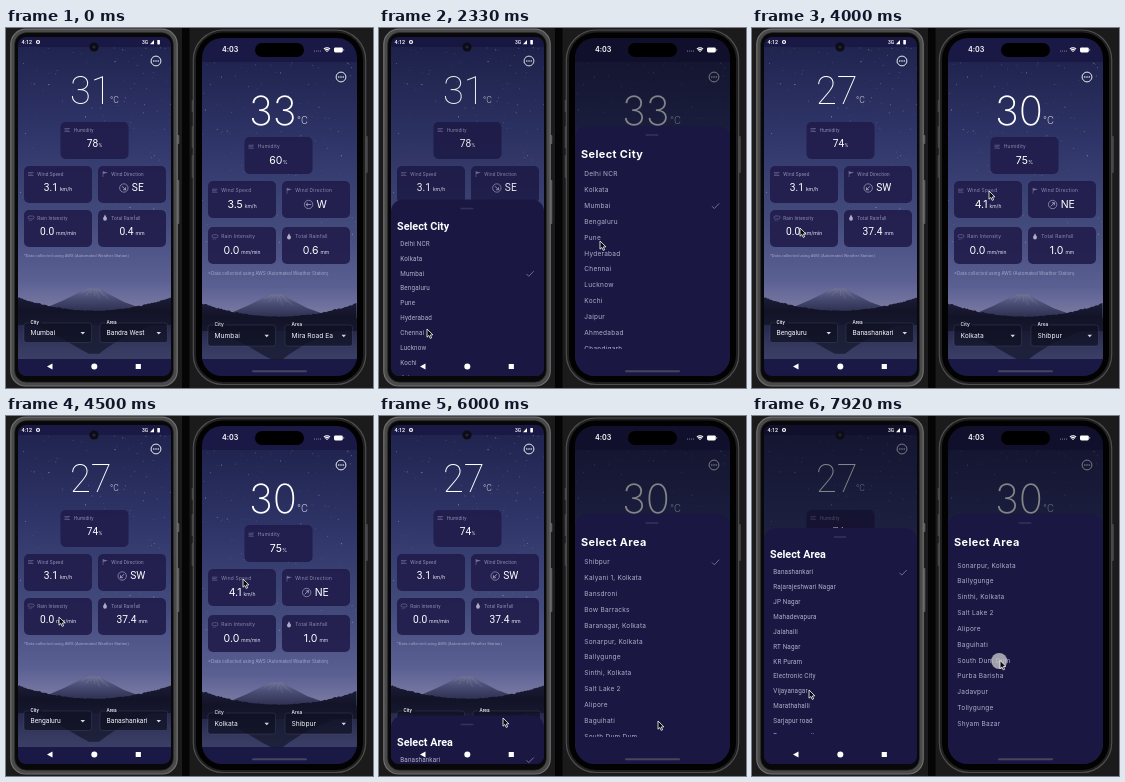
Animation of 367 by 360 pixels, one loop 8000 ms. Source, as an HTML page with a canvas:

```html
<!DOCTYPE html>
<html lang="en">
<head>
<meta charset="utf-8">
<title>Weather app on two phones</title>
<style>
  html, body { margin: 0; width: 100%; height: 100%; overflow: hidden; background: #181819; }
  canvas { display: block; width: 367px; height: 360px; }
</style>
</head>
<body>
<canvas id="stage"></canvas>
<script>
const W = 367, H = 360, LOOP = 8000;
const canvas = document.getElementById('stage');
const ctx = canvas.getContext('2d');
const ratio = window.devicePixelRatio || 1;
canvas.width = W * ratio;
canvas.height = H * ratio;

const CITIES = ['Delhi NCR', 'Kolkata', 'Mumbai', 'Bengaluru', 'Pune', 'Hyderabad', 'Chennai',
  'Lucknow', 'Kochi', 'Jaipur', 'Ahmedabad', 'Chandigarh'];
const NAVY = '#1a1945', SHEET = '#1a1842';

const android = {
  dx: 0, font: 'Roboto, sans-serif', spacing: 0.15,
  screen: [12, 9, 153, 339, 8], sky: [19, 331], peak: [88, 260], seed: 7,
  menu: [150, 33], temp: [64, 75.5, 38], tempWeight: 200, degree: [104, 75, 8.6],
  rows: [94, 138, 182], labelDy: 8, valueDy: 22, value: 10.2, unit: 5.2, label: 4.7,
  note: [227.5, 4.2], drop: [295, 19.5], dropX: [18, 94], dropSize: 6.75,
  sheet: { top: 112, hidden: 347, title: 27, titleSize: 10.8, row: 44.6, pitch: 14.86, size: 6.3, bottom: 206, check: 151, handle: 88 },
  opens: [[2184, 3650, 400], [5972, 9000, 400]],
  dim: p => 0.5 * clamp((p - 0.7) / 0.3),
  chosenAt: 3650, loadedAt: 4000,
  places: [['Mumbai', 'Bandra West'], ['Bengaluru', 'Banashankari']],
  data: [
    { temp: '31', humidity: '78', wind: '3.1', dir: 'SE', angle: 45, rain: '0.4' },
    { temp: '27', humidity: '74', wind: '3.1', dir: 'SW', angle: 135, rain: '37.4' }],
  cityChecks: [2, 3],
  areas: ['Banashankari', 'Rajarajeshwari Nagar', 'JP Nagar', 'Mahadevapura', 'Jalahalli', 'RT Nagar',
    'KR Puram', 'Electronic City', 'Vijayanagar', 'Marathahalli', 'Sarjapur road', 'Basavanagudi'],
  scroll: () => 0,
  cursor: [[0, 62, 372], [500, 55, 340], [900, 48, 301], [2330, 48, 301], [2900, 45, 240], [3330, 42, 213],
    [3600, 42, 200], [4000, 48, 200], [4500, 53, 201], [5300, 100, 270], [5700, 124, 302], [6250, 124, 302],
    [7000, 80, 270], [7920, 57, 274]]
};

const iphone = {
  dx: 184, font: 'Inter, sans-serif', spacing: 0.25,
  screen: [196, 10, 155, 338, 20], sky: [34, 331], peak: [271, 266], seed: 19,
  menu: [335, 49], temp: [243, 97, 40], tempWeight: 200, degree: [291, 96, 10.6],
  rows: [109, 153, 199], labelDy: 9.7, valueDy: 23.5, value: 10.5, unit: 5, label: 4.8,
  note: [245.5, 4.5], drop: [297, 21], dropX: [202, 279], dropSize: 6.7,
  sheet: { top: 98, hidden: 348, title: 29, titleSize: 10.9, row: 48.3, pitch: 15.85, size: 6.5, bottom: 223, check: 336.5, handle: 273 },
  opens: [[1400, 3100, 450], [5150, 9000, 450]],
  dim: p => 0.5 * Math.sqrt(clamp(p)),
  chosenAt: 3100, loadedAt: 3750,
  places: [['Mumbai', 'Mira Road Ea'], ['Kolkata', 'Shibpur']],
  data: [
    { temp: '33', humidity: '60', wind: '3.5', dir: 'W', angle: 180, rain: '0.6' },
    { temp: '30', humidity: '75', wind: '4.1', dir: 'NE', angle: -45, rain: '1.0' }],
  cityChecks: [2, 1],
  areas: ['Shibpur', 'Kalyani 1, Kolkata', 'Bansdroni', 'Bow Barracks', 'Baranagar, Kolkata', 'Sonarpur, Kolkata',
    'Ballygunge', 'Sinthi, Kolkata', 'Salt Lake 2', 'Alipore', 'Baguihati', 'South Dum Dum', 'Purba Barisha',
    'Jadavpur', 'Tollygunge', 'Shyam Bazar'],
  scroll: t => 76 * ease((t - 6250) / 900),
  cursor: [[0, 262, 372], [800, 249, 310], [1100, 247, 293], [1400, 247, 293], [2000, 228, 235], [2330, 221, 213],
    [2800, 218, 163], [3050, 220, 160], [3330, 237, 163], [4500, 237, 163], [4900, 290, 300], [5400, 290, 300],
    [6000, 279, 305], [6500, 279, 300], [7000, 275, 270], [7500, 252, 246], [7920, 248, 244.5]]
};

function clamp(v) { return Math.min(1, Math.max(0, v)); }
function ease(v) { return 1 - (1 - clamp(v)) ** 3; }

function random(seed) {
  return () => (seed = (seed * 16807) % 2147483647) / 2147483647;
}

function along(keys, t) {
  const i = keys.findIndex(k => k[0] > t);
  if (i < 0) return keys.at(-1).slice(1);
  const [a, b] = [keys[i - 1], keys[i]];
  const u = (t - a[0]) / (b[0] - a[0]), s = u * u * (3 - 2 * u);
  return [a[1] + (b[1] - a[1]) * s, a[2] + (b[2] - a[2]) * s];
}

function box(x, y, w, h, r, fill, stroke, line = 1) {
  ctx.beginPath();
  ctx.roundRect(x, y, w, h, r);
  paint(fill, stroke, line);
}

function circle(x, y, r, fill, stroke, line = 1) {
  ctx.beginPath();
  ctx.arc(x, y, r, 0, 7);
  paint(fill, stroke, line);
}

function shape(points, fill, stroke, line = 1) {
  ctx.beginPath();
  points.forEach(([x, y]) => ctx.lineTo(x, y));
  if (fill) ctx.closePath();
  paint(fill, stroke, line);
}

function paint(fill, stroke, line) {
  if (fill) { ctx.fillStyle = fill; ctx.fill(); }
  if (stroke) { ctx.strokeStyle = stroke; ctx.lineWidth = line; ctx.stroke(); }
}

function setFont(size, family, weight = 400, spacing = 0) {
  ctx.font = `${weight} ${size}px ${family}`;
  ctx.letterSpacing = spacing + 'px';
}

function text(str, x, y, color, size, family, weight, spacing) {
  setFont(size, family, weight, spacing);
  ctx.fillStyle = color;
  ctx.fillText(str, x, y);
}

function gradient(y0, y1, ...stops) {
  const g = ctx.createLinearGradient(0, y0, 0, y1);
  stops.forEach(([at, color]) => g.addColorStop(at, color));
  return g;
}

function drawLandscape(p) {
  const [x, , w] = p.screen, [top, bottom] = p.sky, [px, py] = p.peak;
  const base = py + 24, shore = py + 37;
  ctx.fillStyle = gradient(top, base, [0, '#20244f'], [0.3, '#2e3467'], [0.65, '#434a7c'], [0.88, '#5b6093'], [1, '#7d7da4']);
  ctx.fillRect(x, top, w, base - top);

  const rnd = random(p.seed);
  for (let i = 0; i < 190; i++) {
    const sx = x + rnd() * w, sy = top + rnd() ** 1.4 * 190, s = 0.35 + rnd() * 0.6;
    ctx.fillStyle = `rgba(200,208,245,${0.12 + rnd() ** 2 * 0.6})`;
    ctx.fillRect(sx, sy, s, s);
  }

  const ridge = [[-58, 24], [-30, 12], [-14, 4], [-5, 0], [5, 0], [13, 5], [30, 14], [58, 24]];
  const at = ([dx, dy]) => [px + dx, py + dy];
  shape(ridge.map(at), gradient(py, base, [0, '#6c6e93'], [0.4, '#4b4e75'], [1, '#2b2e4d']));
  for (let i = -3; i <= 3; i++) {
    shape([[i * 1.6, 1], [i * 4.6 + 1, 8 + i % 2 * 3]].map(at), null, 'rgba(160,162,190,.35)', 0.6);
  }

  // Lake with the mirrored mountain, then the dark land in front of it.
  ctx.fillStyle = gradient(shore - 2, bottom, [0, '#25274a'], [0.5, '#33365c'], [1, '#3b3e66']);
  ctx.fillRect(x, base, w, bottom - base);
  shape(ridge.map(([dx, dy]) => [px + dx, shore + (24 - dy) * 1.2]), 'rgba(22,24,46,.75)');

  const land = [[x, shore]];
  for (let dx = 0; dx <= w; dx += 1.5) {
    const edge = Math.abs(dx / w * 2 - 1);
    land.push([x + dx, base - 1 - 13 * edge ** 2 - rnd() * (0.6 + edge)]);
  }
  land.push([x + w, shore]);
  shape(land, gradient(base - 14, shore, [0, '#1b1c36'], [0.5, '#121327'], [1, '#16182f']));
}

function drawIcon(kind, x, y) {
  const c = '#7572a0';
  if (kind === 'wind') {
    [-1.5, 0, 1.5].forEach((d, i) => shape([[x - 3, y + d], [x + 2.5 - i % 2, y + d]], null, c, 0.6));
  } else if (kind === 'flag') {
    shape([[x - 2, y + 3], [x - 2, y - 3]], null, c, 0.6);
    shape([[x - 2, y - 2.5], [x + 3, y - 1.5], [x - 2, y]], c);
  } else if (kind === 'cloud') {
    box(x - 3, y - 2, 6, 3, 1.5, null, c, 0.6);
    [-1.5, 0.5].forEach(d => shape([[x + d, y + 2], [x + d - 0.6, y + 3.2]], null, c, 0.5));
  } else {
    shape([[x, y - 3.5], [x + 1.7, y], [x - 1.7, y]], '#aeacc9');
    circle(x, y + 0.8, 1.9, '#aeacc9');
  }
}

function drawCard(p, x, y, icon, label, value, unit, angle) {
  box(x, y, 68, 37, 5, 'rgba(33,28,76,.9)');
  const ly = y + p.labelDy, vy = y + p.valueDy;
  drawIcon(icon, x + 7, ly);
  text(label, x + 13.3, ly + 0.2, '#8f8db4', p.label, p.font, 400, p.spacing);

  const gap = unit === '%' ? 0.3 : 2, compass = angle !== undefined;
  setFont(p.value, p.font);
  const big = ctx.measureText(value).width;
  setFont(p.unit, p.font);
  const small = unit ? ctx.measureText(unit).width + gap : 0;
  let left = x + 34 - (big + small + (compass ? 12.5 : 0)) / 2;
  if (compass) {
    ctx.save();
    ctx.translate(left + 4, vy);
    circle(0, 0, 4.2, null, '#b9b8d2', 0.6);
    ctx.rotate(angle * Math.PI / 180);
    shape([[-2.6, 0], [2.6, 0]], null, '#b9b8d2', 0.7);
    shape([[0.6, -1.7], [2.6, 0], [0.6, 1.7]], null, '#b9b8d2', 0.7);
    ctx.restore();
    left += 12;
  }
  text(value, left, vy + 0.3, '#fff', p.value, p.font);
  if (unit) text(unit, left + big + gap, vy + 1.6, '#e4e3f0', p.unit, p.font);
}

function drawDropdown(p, x, label, value) {
  const [y, h] = p.drop;
  box(x, y, 67.5, h, 2.5, 'rgba(15,16,34,.72)', 'rgba(140,142,172,.28)', 0.6);
  ctx.fillStyle = '#14162b';
  ctx.fillRect(x + 5, y - 1, 13, 2);
  text(label, x + 6.5, y - 0.5, '#f0f0f6', 4.8, p.font, 500);
  const mid = y + h / 2 + 0.2;
  text(value, x + 6.5, mid, '#f3f3f8', p.dropSize, p.font);
  shape([[x + 56.5, mid - 1], [x + 61, mid - 1], [x + 58.75, mid + 1.5]], '#d8d8e2');
}

function drawApp(p, t) {
  const d = p.data[+(t >= p.loadedAt)], place = p.places[+(t >= p.chosenAt)];
  const [r1, r2, r3] = p.rows, x = p.dx;
  const [mx, my] = p.menu;
  circle(mx, my, 4.9, null, '#fff', 0.9);
  [-2.2, 0, 2.2].forEach(i => circle(mx + i, my, 0.75, '#fff'));

  ctx.textBaseline = 'alphabetic';
  text(d.temp, p.temp[0], p.temp[1], '#fff', p.temp[2], p.font, p.tempWeight);
  text('°C', p.degree[0], p.degree[1], '#d6d6e6', p.degree[2], 'Roboto, sans-serif', 300);
  ctx.textBaseline = 'middle';

  drawCard(p, x + 54.5, r1, 'wind', 'Humidity', d.humidity, '%');
  drawCard(p, x + 18, r2, 'wind', 'Wind Speed', d.wind, 'km/h');
  drawCard(p, x + 92, r2, 'flag', 'Wind Direction', d.dir, '', d.angle);
  drawCard(p, x + 18, r3, 'cloud', 'Rain Intensity', '0.0', 'mm/min');
  drawCard(p, x + 92, r3, 'drop', 'Total Rainfall', d.rain, 'mm');
  text('*Data collected using AWS (Automated Weather Station)', x + 18, p.note[0], '#a3a5c8', p.note[1], p.font);
  drawDropdown(p, p.dropX[0], 'City', place[0]);
  drawDropdown(p, p.dropX[1], 'Area', place[1]);
}

function drawSheet(p, t, shown) {
  const s = p.sheet, [x, , w] = p.screen, left = p.dx + 18;
  const top = s.hidden - (s.hidden - s.top) * shown;
  const picksArea = t > 4600;
  const items = picksArea ? p.areas : CITIES;
  const checked = picksArea ? 0 : p.cityChecks[+(t >= p.chosenAt)];
  const scroll = picksArea ? p.scroll(t) : 0;

  box(x, top, w, H, [12, 12, 0, 0], SHEET);
  box(s.handle - 6.5, top + 8.3, 13, 1.4, 0.7, '#34325f');
  text(picksArea ? 'Select Area' : 'Select City', left, top + s.title, '#fff', s.titleSize, p.font, 700, p.dx ? 0.4 : 0);

  ctx.save();
  ctx.beginPath();
  ctx.rect(x, top + s.row - 8, w, s.bottom - s.row + 8);
  ctx.clip();
  items.forEach((item, i) => {
    const y = top + s.row + i * s.pitch - scroll;
    text(item, left + 3.3, y, '#b0aec8', s.size, p.font, 400, p.spacing);
    if (i === checked) {
      shape([[s.check - 3.5, y + 0.2], [s.check - 1.2, y + 2.5], [s.check + 3.7, y - 2.6]], null, '#8583a2', 0.8);
    }
  });
  ctx.restore();
}

function drawAndroidChrome() {
  text('4:12', 15.5, 14.2, '#fff', 5.4, android.font, 500);
  circle(32, 14, 1.5, null, '#fff', 1.2);
  text('3G', 136, 14.2, '#fff', 5, android.font, 500);
  shape([[144, 16.3], [148, 16.3], [148, 12]], '#fff');
  box(151.3, 12, 2.6, 4.4, 0.6, '#fff');
  circle(88, 19, 4.6, '#0c0c14');
  circle(88, 19, 1.6, '#20243c');
  shape([[41, 338.5], [46.5, 335.5], [46.5, 341.5]], '#fff');
  circle(88.3, 338.5, 3, '#fff');
  box(129.7, 335.9, 5.2, 5.2, 0.3, '#fff');
}

function drawIphoneChrome() {
  text('4:03', 216, 22.2, '#fff', 7.2, iphone.font, 600);
  box(249, 15, 49, 14, 7, '#000');
  for (let i = 0; i < 4; i++) circle(308.5 + i * 2, 23, 0.6, '#8f8fae');
  for (const r of [1.2, 2.8, 4.4]) {
    ctx.beginPath();
    ctx.arc(321, 24.3, r, -2.35, -0.8);
    paint(null, '#fff', 1.1);
  }
  box(328, 19.4, 8.8, 5, 1.4, '#fff');
  box(337.3, 21, 0.8, 1.8, 0.4, '#aaa');
  box(246, 342.2, 55, 2, 1, '#45455f');
}

function drawBodies() {
  ctx.fillStyle = '#1b1b1c';
  ctx.fillRect(0, 0, W, H);
  ctx.fillStyle = '#050505';
  ctx.fillRect(176, 0, 7.5, H);

  [[107, 9], [152, 44]].forEach(([y, h]) => box(170.5, y, 2.8, h, 1, '#5d5d5f'));
  box(4.8, 1.2, 166.4, 356.8, 15, '#49494a', '#707072', 1.2);
  box(8.6, 4.6, 158.8, 349.6, 12, '#08080a', '#2c2c2e', 0.6);

  [[72, 12], [98, 22], [127, 23]].forEach(([y, h]) => box(185.7, y, 2.5, h, 1, '#464648'));
  box(359.3, 108, 2.5, 37, 1, '#464648');
  box(187.3, 2, 172.4, 354.5, 30, '#1f1f20', '#4e4e50', 1.2);
  box(190, 4.4, 167, 349.6, 27, '#020203');
}

function drawCursor([x, y], touching) {
  if (touching) circle(x - 0.8, y + 0.5, 8, 'rgba(190,190,196,.82)');
  const outline = [[0, 0], [0, 8.2], [1.9, 6.5], [3.2, 9.4], [4.6, 8.8], [3.4, 6], [5.9, 5.8]];
  shape(outline.map(([dx, dy]) => [x + dx, y + dy]), '#0a0a0c', '#fff', 0.8);
}

function drawPhone(p, t, drawChrome) {
  const [x, y, w, h, r] = p.screen;
  const shown = p.opens.reduce((sum, [open, close, ms]) => sum + ease((t - open) / ms) - ease((t - close) / ms), 0);
  ctx.save();
  ctx.beginPath();
  ctx.roundRect(x, y, w, h, r);
  ctx.clip();
  ctx.fillStyle = NAVY;
  ctx.fillRect(x, y, w, h);
  drawLandscape(p);
  drawApp(p, t);
  ctx.fillStyle = `rgba(8,8,20,${p.dim(shown)})`;
  ctx.fillRect(x, y, w, h);
  if (shown > 0.001) drawSheet(p, t, shown);
  drawChrome();
  ctx.restore();
}

function draw(t) {
  ctx.setTransform(ratio, 0, 0, ratio, 0, 0);
  ctx.textBaseline = 'middle';
  drawBodies();
  drawPhone(android, t, drawAndroidChrome);
  drawPhone(iphone, t, drawIphoneChrome);
  drawCursor(along(android.cursor, t), false);
  drawCursor(along(iphone.cursor, t), t > 7830);
}

const start = performance.now();
function tick() {
  draw((performance.now() - start) % LOOP);
  requestAnimationFrame(tick);
}
tick();
</script>
</body>
</html>
```
